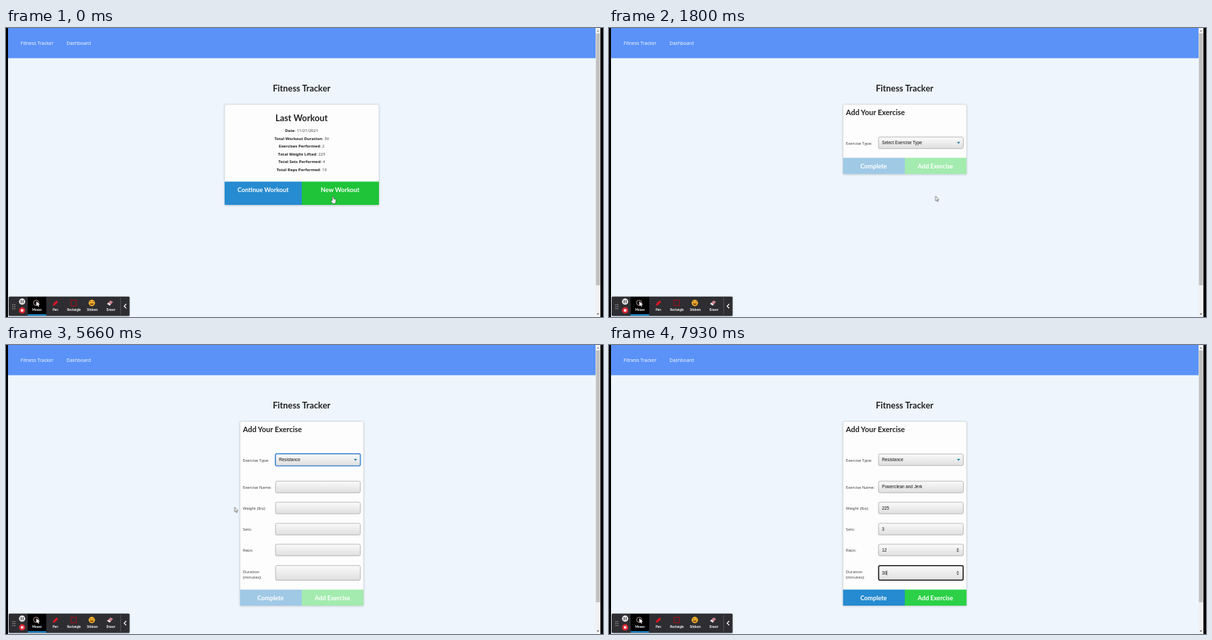
An HTML page for the animation above (8 s loop, 882 by 428 pixels).

```html
<!DOCTYPE html>
<html lang="en">
<head>
<meta charset="utf-8">
<title>Workout recording</title>
<style>
html, body { margin: 0; width: 100%; height: 100%; overflow: hidden; background: #000; }
svg { display: block; width: 882px; height: 428px; }
text { font-family: "Open Sans", sans-serif; font-size: 5.95px; fill: #333; }
.lato { font-family: Lato, sans-serif; font-weight: 700; fill: #212121; }
.h1 { font-size: 12.8px; text-anchor: middle; }
.h2 { font-size: 10.95px; }
.btn text { font-family: Lato, sans-serif; font-weight: 700; font-size: 9.15px; fill: #fff; text-anchor: middle; }
.nav text { font-size: 7px; fill: #fff; }
.stats text { font-size: 6px; text-anchor: middle; }
.stats tspan { font-weight: 700; fill: #222; }
.value { font-family: "Liberation Sans", Arial, sans-serif; font-size: 6.38px; fill: #111; }
.tools text { font-family: Lato, sans-serif; font-weight: 700; font-size: 4.6px; fill: #fff; text-anchor: middle; }
.field { fill: url(#fieldFill); stroke: #a9a9a9; stroke-width: .8; }
.card { fill: #fdfdfd; stroke: #d3d6da; stroke-width: .7; filter: url(#shadow); }

.nav text, .home, .start, .loading, .settled, .form, .empty, .filled, .ring, .hand, .arrow, .resume, .spin {
  animation: 8s step-end infinite;
}
.nav text { animation-name: links; }
.home { animation-name: home; }
.start { animation-name: start; }
.loading { animation-name: loading; }
.settled { animation-name: settled; }
.form { animation-name: form; }
.empty { animation-name: empty; }
.filled { animation-name: filled; }
.ring { animation-name: ring; }
.hand { animation-name: hand; }
.arrow { animation-name: arrow; }
.resume { animation-name: resume; }
.spin { animation-name: spin; }
.path { animation: path 8s linear infinite; }

@keyframes links { 0% { fill: #fff } 9.95% { fill: #786cc9 } 10.72% { fill: #fff } }
@keyframes home { 0% { opacity: 1 } 9.95%, 100% { opacity: 0 } }
@keyframes start { 0% { opacity: 0 } 9.95% { opacity: 1 } 63.2%, 100% { opacity: 0 } }
@keyframes loading { 0% { opacity: 0 } 9.95% { opacity: 1 } 10.72%, 100% { opacity: 0 } }
@keyframes settled { 0% { opacity: 0 } 10.72%, 100% { opacity: 1 } }
@keyframes form { 0% { opacity: 0 } 63.2%, 100% { opacity: 1 } }
@keyframes empty { 0% { opacity: 1 } 84.95%, 100% { opacity: 0 } }
@keyframes filled { 0% { opacity: 0 } 84.95%, 100% { opacity: 1 } }
@keyframes ring { 0% { opacity: 0 } 44.1% { opacity: 1 } 84.95%, 100% { opacity: 0 } }
@keyframes hand { 0% { opacity: 1 } 11.6%, 100% { opacity: 0 } }
@keyframes arrow { 0% { opacity: 0 } 11.6% { opacity: 1 } 76.6%, 100% { opacity: 0 } }
@keyframes resume { 0% { opacity: 0 } 76.6% { opacity: 1 } 90%, 100% { opacity: 0 } }
@keyframes spin { 0% { opacity: 0 } 98.2%, 100% { opacity: 1 } }
@keyframes path {
  0%, 38.2% { transform: translate(482.5px, 249px); animation-timing-function: ease-out }
  40.7%, 51% { transform: translate(420px, 164.5px) }
  51.6%, 60% { transform: translate(422.5px, 180px) }
  62.5%, 68% { transform: translate(424px, 195px); animation-timing-function: ease-in-out }
  76.6%, 100% { transform: translate(23px, 405px) }
}
</style>
</head>
<body>
<svg viewBox="0 0 882 428">
  <defs>
    <linearGradient id="fieldFill" x2="0" y2="1">
      <stop stop-color="#fafafa"/><stop offset="1" stop-color="#dfdfdf"/>
    </linearGradient>
    <filter id="shadow" x="-10%" y="-10%" width="120%" height="120%">
      <feDropShadow dx="0" dy=".6" stdDeviation="1" flood-color="#65707c" flood-opacity=".4"/>
    </filter>
    <path id="caretDown" d="M514 168.8h4.8l-2.4 2.7z" fill="#087ba8"/>
    <path id="spinner" d="M-1.9-.8h3.8L0-2.9zM-1.9.8h3.8L0 2.9z" fill="#444"/>
    <g id="typeRow">
      <text x="350" y="172.6">Exercise Type:</text>
      <rect class="field" x="398.2" y="161.4" width="125.2" height="17.2" rx="2"/>
      <use href="#caretDown"/>
    </g>
    <rect id="focus" x="398" y="161.2" width="125.6" height="17.8" rx="2.2" fill="none" stroke="#4d90d9" stroke-width="1.7"/>
  </defs>

  <rect x="3" width="868" height="428" fill="#eef5fd"/>
  <rect x="3" width="868" height="44.7" fill="#5a92f8"/>
  <g class="nav">
    <text x="21.8" y="25.1">Fitness Tracker</text>
    <text x="89.3" y="25.1">Dashboard</text>
  </g>
  <text class="lato h1" x="436.7" y="94.3">Fitness Tracker</text>

  <g class="home">
    <rect class="card" x="323" y="113.2" width="228" height="148.8" rx="1.6"/>
    <text class="lato h1" x="436.7" y="137.7">Last Workout</text>
    <g class="stats">
      <text x="436.8" y="154.4"><tspan>Date</tspan>: 11/21/2021</text>
      <text x="436.8" y="165.8"><tspan>Total Workout Duration</tspan>: 30</text>
      <text x="436.8" y="177.3"><tspan>Exercises Performed</tspan>: 2</text>
      <text x="436.8" y="188.7"><tspan>Total Weight Lifted</tspan>: 225</text>
      <text x="436.8" y="200.1"><tspan>Total Sets Performed</tspan>: 4</text>
      <text x="436.8" y="211.5"><tspan>Total Reps Performed</tspan>: 10</text>
    </g>
    <g class="btn">
      <path d="M323 227.4h114V262h-112.5q-1.5 0-1.5-1.5z" fill="#268bd0"/>
      <path d="M437 227.4h114v33.1q0 1.5-1.5 1.5H437z" fill="#1fc439"/>
      <text x="379.8" y="243">Continue Workout</text>
      <text x="493.6" y="243">New Workout</text>
    </g>
  </g>

  <g class="start">
    <rect class="card" x="345.8" y="113.2" width="182.4" height="103" rx="1.6"/>
    <text class="lato h2" x="350" y="128.8">Add Your Exercise</text>
    <use href="#typeRow"/>
    <use href="#focus" class="ring"/>
    <text class="value" x="403.2" y="172.2">Select Exercise Type</text>
    <g class="btn loading">
      <path d="M345.8 192.3H437v24h-91.2z" fill="#b5d6ec"/>
      <path d="M437 192.3h91.2v24H437z" fill="#bbefc4"/>
      <text x="390.8" y="207.9" style="fill:#cbdfed">Complete</text>
      <text x="482.2" y="207.9" style="fill:#cfe9d3">Add Exercise</text>
    </g>
    <g class="btn settled">
      <path d="M345.8 192.3H437v24h-91.2z" fill="#a0c9e6"/>
      <path d="M437 192.3h91.2v24H437z" fill="#a3ebaf"/>
      <text x="390.8" y="207.9">Complete</text>
      <text x="482.2" y="207.9">Add Exercise</text>
    </g>
  </g>

  <g class="form">
    <rect class="card" x="345.8" y="113.2" width="182.4" height="272.6" rx="1.6"/>
    <text class="lato h2" x="350" y="128.8">Add Your Exercise</text>
    <use href="#typeRow"/>
    <use href="#focus" class="ring"/>
    <text class="value" x="403.2" y="172.2">Resistance</text>
    <text x="350" y="212.8">Exercise Name:</text>
    <text x="350" y="244">Weight (lbs):</text>
    <text x="350" y="275">Sets:</text>
    <text x="350" y="306">Reps:</text>
    <text x="350" y="337.6">Duration</text>
    <text x="350" y="346.3">(minutes):</text>
    <g class="field">
      <rect x="398.2" y="201.7" width="125.2" height="17.2" rx="2"/>
      <rect x="398.2" y="232.8" width="125.2" height="17.2" rx="2"/>
      <rect x="398.2" y="264.1" width="125.2" height="17.2" rx="2"/>
      <rect x="398.2" y="295" width="125.2" height="17.2" rx="2"/>
      <rect x="398.2" y="326.6" width="125.2" height="21.8" rx="2"/>
    </g>
    <g class="btn empty">
      <path d="M345.8 362.3H437v23.6h-91.2z" fill="#a0c9e6"/>
      <path d="M437 362.3h91.2v23.6H437z" fill="#a3ebaf"/>
    </g>
    <g class="btn filled">
      <path d="M345.8 362.3H437v23.6h-91.2z" fill="#268bd0"/>
      <path d="M437 362.3h91.2v23.6H437z" fill="#2cd147"/>
    </g>
    <g class="btn">
      <text x="390.8" y="377.9">Complete</text>
      <text x="482.2" y="377.9">Add Exercise</text>
    </g>
    <g class="filled">
      <text class="value" x="403.2" y="212.4">Powerclean and Jerk</text>
      <text class="value" x="403.2" y="243.6">225</text>
      <text class="value" x="403.2" y="275">3</text>
      <text class="value" x="403.2" y="306">12</text>
      <use href="#spinner" class="spin" x="515.2" y="303.8"/>
      <rect x="398.4" y="326.7" width="124.8" height="21.6" rx="2" fill="none" stroke="#161616" stroke-width="1.5"/>
      <text class="value" x="403.2" y="339.8">30</text>
      <path d="M410.6 334v7" stroke="#111" stroke-width=".6"/>
      <use href="#spinner" x="515.2" y="337.6"/>
    </g>
  </g>

  <rect x="871" width="7.2" height="428" fill="#f1f1f1"/>
  <rect x="871.6" y="8" width="6" height="373" fill="#c1c1c1"/>
  <path d="M872.8 5.2h3.4l-1.7-2z" fill="#777"/>
  <path d="M872.8 422.8h3.4l-1.7 2z" fill="#444"/>

  <g class="tools">
    <rect x="4" y="397.8" width="178.6" height="28.6" rx="1.5" fill="#2f2f31" filter="url(#shadow)"/>
    <path d="M10.2 409v8M12.9 409v8" stroke="#bbb" stroke-width="1.2" stroke-dasharray="1.2 1.8"/>
    <rect x="32" y="398" width="27.4" height="27" fill="#000"/>
    <rect x="32" y="424" width="27.4" height="1.8" fill="#1b9be8"/>
    <circle cx="23.8" cy="405.2" r="4.6" fill="#e9e9e9"/>
    <path d="M22.4 403v4.4M25.2 403v4.4" stroke="#333" stroke-width="1.2"/>
    <g class="resume">
      <circle cx="23.8" cy="405.2" r="4.7" fill="#27a80f"/>
      <path d="M22.4 402.8v4.8l4-2.4z" fill="#fff"/>
    </g>
    <circle cx="23.8" cy="418.2" r="4.6" fill="#df2935"/>
    <rect x="22.1" y="416.5" width="3.4" height="3.4" fill="#fff"/>
    <circle cx="44.6" cy="407" r="3.9" fill="none" stroke="#c8a2a5" stroke-width=".9"/>
    <path d="M44.8 404.7v7l1.7-1.5 1.2 2.5 1.3-.6-1.2-2.4h2.3z" fill="#fff"/>
    <path d="M69.2 411.4l.8-3.2 4.6-4.6 2.3 2.3-4.6 4.6z" fill="#df1525"/>
    <rect x="96" y="403.3" width="8" height="8" fill="none" stroke="#a30d1b" stroke-width="1.1"/>
    <circle cx="126.8" cy="407.3" r="4.7" fill="#f2b52c"/>
    <path d="M124 405.6h2M127.8 405.6h2M124.2 408.4q2.6 3 5.2 0z" fill="#7a3a17" stroke="#7a3a17" stroke-width=".8"/>
    <path d="M149.4 408.6l5-5.2 3.8 2.4-5 5.3z" fill="#c9858f"/>
    <path d="M149.4 408.6l1.6-1.7 3.8 2.5-1.6 1.7z" fill="#eee"/>
    <text x="45.8" y="419.3">Mouse</text>
    <text x="73" y="419.3">Pen</text>
    <text x="100.4" y="419.3">Rectangle</text>
    <text x="127.6" y="419.3">Stickers</text>
    <text x="155" y="419.3">Eraser</text>
    <path d="M169.3 399.5v25" stroke="#666" stroke-width=".7"/>
    <path d="M177.6 408.7l-3 3.2 3 3.2" fill="none" stroke="#fff" stroke-width="1.3"/>
  </g>

  <path class="hand" d="M482.2 255.4v-5q.1-1 .9-1t.9 1v2.6l2.5.5q1.1.3 1 1.5l-.5 3.3-.8 1.6h-3.7l-2.4-3.3q-.3-1 .6-1.2z" fill="#fff" stroke="#333" stroke-width=".6"/>
  <g class="arrow">
    <path class="path" d="M0 0v7l1.6-1.4 1.1 2.6 1.2-.5-1.1-2.5h2.1z" fill="#fff" stroke="#333" stroke-width=".6"/>
  </g>
</svg>
</body>
</html>
```
